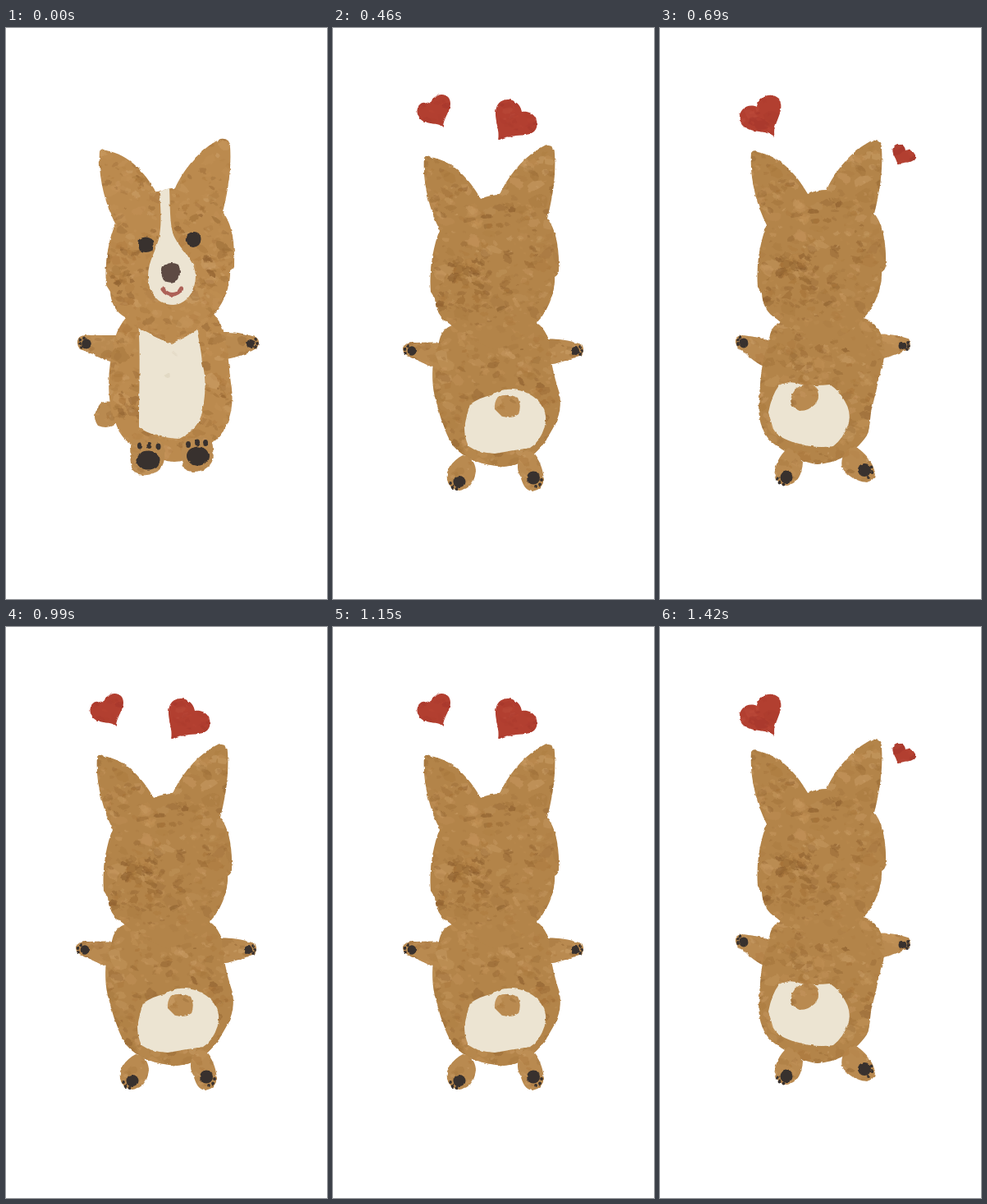
An HTML page that plays this animation: 391x695 px, repeating every 1530 ms.

```html
<!DOCTYPE html>
<html lang="en">
<head>
<meta charset="utf-8">
<title>Jumping corgi</title>
<style>
html, body { margin: 0; width: 100%; height: 100%; overflow: hidden; background: #fff; }
svg { display: block; width: 100vw; height: 100vh; }
</style>
</head>
<body>
<svg id="stage" viewBox="0 0 391 695" xmlns="http://www.w3.org/2000/svg"></svg>
<script>
const INK = '#38312e', CREAM = '#ece4d2', RED = '#b23f30';
const FRONT = '#bb8a4e', BACK = '#b38449', LIMB = '#b98a50';
const DARK = ['#8a5c2c', '#9c6c35', '#a87439'], LIGHT = ['#cc9d66', '#c6955b', '#d2a873'];

let clips = 0;

function random(seed) {
  let s = seed * 7919 + 17;
  return () => {
    s = (s * 1664525 + 1013904223) % 4294967296;
    return s / 4294967296;
  };
}

const shape = (d, fill) => `<path d="${d}" fill="${fill}"/>`;
const oval = (x, y, rx, ry = rx, fill = INK, turn = 0) =>
  `<ellipse cx="${x}" cy="${y}" rx="${rx}" ry="${ry}" fill="${fill}" transform="rotate(${turn} ${x} ${y})"/>`;
const group = (x, y, inner) => `<g transform="translate(${x} ${y})">${inner}</g>`;
const line = (d, color, width) =>
  `<path d="${d}" fill="none" stroke="${color}" stroke-width="${width}" stroke-linecap="round"/>`;

// An irregular, slightly slanted brush dab
function dab(rnd, x, y, size, fill, alpha) {
  const n = 8, tilt = -0.6 + rnd() * 1.5, flat = 0.4 + rnd() * 0.4;
  const pts = [];
  for (let i = 0; i < n; i++) {
    const a = i / n * Math.PI * 2, r = size * (0.6 + rnd() * 0.6);
    const u = Math.cos(a) * r, v = Math.sin(a) * r * flat;
    const px = x + u * Math.cos(tilt) - v * Math.sin(tilt);
    const py = y + u * Math.sin(tilt) + v * Math.cos(tilt);
    pts.push(px.toFixed(1) + ',' + py.toFixed(1));
  }
  return `<path d="M${pts.join('L')}Z" fill="${fill}" opacity="${alpha.toFixed(2)}"/>`;
}

// A shape painted with mottled watercolour; spots are [x, y, radius, count]
function painted(d, base, seed, spots = [], darks = DARK, lights = LIGHT) {
  const rnd = random(seed), id = 'clip' + clips++;
  const nums = d.match(/-?\d+(\.\d+)?/g).map(Number);
  const xs = nums.filter((_, i) => i % 2 === 0), ys = nums.filter((_, i) => i % 2);
  const x0 = Math.min(...xs), y0 = Math.min(...ys);
  const w = Math.max(...xs) - x0, h = Math.max(...ys) - y0;
  const pick = list => list[Math.floor(rnd() * list.length)];
  let out = '';
  for (let i = 0, n = w * h / 85; i < n; i++) {
    const tones = rnd() < 0.5 ? darks : lights;
    out += dab(rnd, x0 + rnd() * w, y0 + rnd() * h, 2 + rnd() * rnd() * 12, pick(tones), 0.12 + rnd() * 0.28);
  }
  for (const [x, y, r, n] of spots) {
    for (let i = 0; i < n; i++) {
      const a = rnd() * 6.283, q = Math.sqrt(rnd()) * r;
      out += dab(rnd, x + Math.cos(a) * q, y + Math.sin(a) * q, 2 + rnd() * 6, pick(darks), 0.25 + rnd() * 0.35);
    }
  }
  return `<clipPath id="${id}"><path d="${d}"/></clipPath>${shape(d, base)}<g clip-path="url(#${id})">${out}</g>`;
}

const heart = (d, seed) => painted(d, RED, seed, [], ['#9c3128', '#a5372b'], ['#c04a3a', '#bd5140']);
const limb = (d, seed) => painted(d, LIMB, seed);

// Pad with toes: [x, y, rx, ry], then toe centres
const paw = ([x, y, rx, ry], toes, tx = 1.9, ty = tx) =>
  oval(x, y, rx, ry) + toes.map(([a, b]) => oval(a, b, tx, ty)).join('');

const HEAD = 'M114,150 Q117,145 122,149 C150,154 169,176 183,200 Q194,195 206,195 ' +
  'C215,174 236,147 261,135 Q273,133 273,145 C275,174 269,205 264,224 ' +
  'C274,236 279,258 278,288 Q277,293 273,295 C274,315 264,337 252,350 ' +
  'C238,367 217,377 201,384 C182,377 160,366 145,352 C133,345 128,335 127,321 L122,313 ' +
  'C120,290 124,260 133,238 C120,212 112,180 114,150 Z';

const frontHead = painted(HEAD, FRONT, 5,
  [[143, 287, 23, 28], [158, 188, 10, 8], [140, 322, 14, 8], [225, 232, 22, 10], [256, 285, 18, 8]]) +
  shape('M187,199 Q193,196 199,195 C200,215 199,238 204,252 C211,269 229,280 231,300 ' +
    'C231,322 219,337 203,337 C185,337 173,322 173,302 C173,283 184,270 187,252 C190,236 188,216 187,199 Z', CREAM) +
  shape('M162,257 Q170,252 178,257 Q181,264 178,271 Q170,275 163,271 Q160,264 162,257 Z', INK) +
  shape('M220,252 Q228,245 235,250 Q240,257 235,264 Q228,270 221,264 Q217,258 220,252 Z', INK) +
  shape('M191,290 Q200,283 210,288 Q214,297 210,306 Q201,313 192,307 Q187,298 191,290 Z', '#5d4a43') +
  line('M191,318 Q195,324 202,324.5 Q210,324 213.500,317', '#ad6157', 5);

const backHead = painted(HEAD, BACK, 9,
  [[168, 288, 26, 28], [195, 315, 24, 18], [142, 318, 18, 14], [205, 220, 20, 9], [157, 192, 12, 7], [244, 268, 14, 6]]);

const frontBody = painted('M150,348 C138,362 134,370 131,386 C124,415 122,452 133,480 ' +
  'C138,497 150,506 160,512 C175,521 190,527 205,528 C220,528 238,516 250,506 ' +
  'C268,494 278,468 275,440 C272,418 271,402 269,388 C266,366 260,356 252,347 Z', FRONT, 14,
  [[144, 460, 16, 10], [258, 440, 14, 8], [185, 508, 22, 6]]) +
  shape('M161,355 C164,395 162,440 162,486 C172,494 192,499 211,500 C226,493 238,480 240,462 ' +
    'C243,445 244,425 239,408 C238,390 233,375 231,355 Z', CREAM) +
  dab(random(3), 197, 423, 4, '#ded4bd', 0.7) + dab(random(8), 207, 397, 5, '#e2d9c4', 0.7);

const standing =
  limb('M133,456 Q113,451 112,464 Q104,472 112,484 Q125,489 134,481 L145,470 Z', 21) +
  limb('M146,374 L104,374 Q91,373 88,378 Q85,385 90,391 C105,395 115,404 132,407 L146,400 Z', 22) +
  limb('M254,371 C275,368 290,372 304,376 Q311,381 306,389 C295,397 280,401 264,404 Z', 23) +
  paw([98, 384.5, 5.8, 6], [[90.5, 379], [90, 384], [92, 388.5], [95, 377.5]]) +
  paw([298, 384.5, 5, 5.5], [[304, 379], [306, 384], [304, 388]]) +
  frontBody +
  limb('M151,509 Q152,500 161,501 L183,499 Q194,502 193,514 C194,526 192,534 184,540 Q168,548 156,541 C150,531 152,520 151,509 Z', 24) +
  limb('M218,501 Q232,496 246,500 Q253,504 252,514 C255,525 249,534 240,538 Q226,543 217,536 C212,526 213,512 218,501 Z', 25) +
  paw([173, 526, 14.5, 11.5], [[163, 508.5], [174.5, 508], [185.5, 509.5]], 3, 4) +
  paw([233.5, 521, 13.5, 11.5], [[222, 507], [233, 504.5], [243, 505]], 3, 4) +
  frontHead;

const jumping =
  limb('M152,410 Q138,403 128,409 Q121,424 127,435 Q138,442 150,435 Z', 31) +
  limb('M152,312 L121,300 Q114,296 109,302 Q107,310 113,316 C118,329 127,340 140,346 Z', 32) +
  limb('M268,299 C288,301 296,317 303,333 Q305,340 300,346 Q293,349 287,344 L270,337 Z', 33) +
  paw([119.5, 309.5, 6], [[112, 306], [112.5, 302], [117, 301]]) +
  paw([293.5, 338, 5], [[299, 344], [302, 338], [295.5, 345.5]]) +
  limb('M174,440 C171,470 172,480 173,490 Q184,499 193,492 C196,480 194,465 195,440 Z', 34) +
  limb('M226,440 C225,470 225,480 228,490 Q236,496 243,489 C248,478 246,465 245,440 Z', 35) +
  paw([178.5, 490.5, 2.5, 4.5], [[183.5, 491.5], [188, 490]], 2.2, 4.3) +
  paw([231, 488.5, 2.3, 4], [[236, 488], [240, 486.5]], 2.2, 4) +
  group(10.5, -69, frontBody + frontHead) +
  ['M144,492 Q145,505 151,514', 'M151,486 Q151,492 153,496',
   'M272,482 Q272,492 268,500', 'M278,495 Q277,504 272,510'].map(d => line(d, INK, 1.5)).join('');

const wagRight =
  limb('M140,382 L100,383 Q88,382 85,389 Q85,398 92,400 C104,404 115,412 132,416 Z', 41) +
  limb('M254,379 C275,377 290,381 303,385 Q307,391 303,398 C290,403 275,408 258,411 Z', 42) +
  paw([96, 393, 5.3, 5.8], [[87.5, 391], [88, 396], [91, 387]]) +
  paw([295, 393, 5], [[301, 388], [303, 393], [301, 397]]) +
  painted('M145,362 C132,367 130,376 128,388 C119,405 120,435 125,452 C132,480 139,498 146,508 ' +
    'C160,525 182,532 208,534 C235,533 255,512 264,494 C274,478 279,465 276,445 ' +
    'C268,420 265,405 263,380 C259,368 252,361 247,358 Z', BACK, 43, [[195, 410, 40, 12], [260, 445, 15, 6]]) +
  shape('M160,486 Q163,470 167,458 Q180,449 193,447 Q205,438 220,440 Q240,442 253,457 Q262,469 258,485 ' +
    'Q252,504 240,511 Q220,514 197,518 Q176,517 165,509 Q160,498 160,486 Z', CREAM) +
  limb('M201,449 Q213,444 225,450 Q230,460 226,470 Q216,477 205,472 L197,464 Q196,456 201,449 Z', 44) +
  limb('M158,520 C145,527 137,538 139,550 Q142,562 154,563 C168,561 173,550 174,538 Q172,522 158,520 Z', 45) +
  limb('M237,513 C225,520 222,535 228,545 C231,555 234,563 243,564 Q255,562 257,550 C256,535 249,518 237,513 Z', 46) +
  paw([154, 552.5, 7.5], [[143, 554], [145.5, 559], [150.5, 561]]) +
  paw([244, 547.5, 8], [[254, 550], [252, 555.5], [247, 558]]) +
  group(-3, 8, backHead) +
  heart('M134,121 C128,113 107,120 103,105 C100,94 110,87 119,92 C121,82 134,77 141,85 C148,97 134,108 134,121 Z', 47) +
  heart('M201,137 C204,125 195,108 199,97 C203,83 226,83 230,102 C242,100 251,110 248,121 C243,136 220,126 201,137 Z', 48);

const wagLeft =
  limb('M140,383 C118,375 108,375 100,374 Q90,375 92,383 Q94,391 101,393 C110,402 118,409 132,414 Z', 51) +
  limb('M256,374 C275,371 290,374 302,378 Q307,384 303,391 C290,397 280,400 262,405 Z', 52) +
  paw([102, 383.5, 5.5, 6], [[95, 380], [95, 385], [97.5, 377]]) +
  paw([295.5, 387, 5], [[302, 383], [303, 387], [301, 391]]) +
  painted('M148,357 C134,363 134,374 132,386 C124,400 122,432 121,450 C118,475 124,492 136,504 ' +
    'C150,515 175,530 192,531 C220,529 240,514 252,496 C257,484 255,475 258,463 ' +
    'C264,440 266,428 269,416 C275,402 275,385 268,370 C260,357 252,354 247,353 Z', BACK, 53, [[195, 400, 40, 12], [245, 440, 16, 6]]) +
  shape('M132,468 Q136,447 145,435 Q158,428 172,434 Q190,436 207,434 Q219,442 225,454 Q233,467 230,481 ' +
    'Q223,500 211,509 Q187,512 166,505 Q145,500 138,488 Z', CREAM) +
  limb('M165,440 Q176,430 189,436 Q196,446 191,456 Q182,466 170,466 Q160,462 159,453 Q160,446 165,440 Z', 54) +
  limb('M156,511 C145,520 138,535 140,547 Q146,557 155,557 C167,554 173,545 174,528 Q168,516 156,511 Z', 55) +
  limb('M237,509 C225,512 219,525 222,535 C227,545 240,552 252,553 Q262,550 262,542 C260,530 250,516 237,509 Z', 56) +
  paw([154, 547, 7.5], [[143, 548.5], [145.5, 553.5], [150.5, 555.5]]) +
  paw([249, 538, 8], [[257.5, 534.5], [258.5, 541], [254, 547]]) +
  group(-3, 2, backHead) +
  heart('M140,133 C132,122 102,131 97,112 C95,99 107,91 118,96 C119,83 136,77 145,86 C154,102 135,117 140,133 Z', 57) +
  heart('M289,168 C290,160 281,153 284,146 C287,138 298,140 299,149 C305,147 312,152 311,158 C307,166 296,161 289,168 Z', 58);

const stage = document.getElementById('stage');
stage.innerHTML =
  `<filter id="rough" filterUnits="userSpaceOnUse" x="0" y="0" width="391" height="695" color-interpolation-filters="sRGB">
    <feTurbulence type="fractalNoise" baseFrequency="0.16" numOctaves="2" seed="4" result="noise"/>
    <feDisplacementMap in="SourceGraphic" in2="noise" scale="3" xChannelSelector="R" yChannelSelector="G"/>
  </filter>` +
  [standing, jumping, wagRight, wagLeft].map(p => `<g class="pose" filter="url(#rough)">${p}</g>`).join('');

const poses = stage.querySelectorAll('.pose');
const LOOP = 1530;
// [end time, pose]
const steps = [[230, 0], [460, 1], [690, 2], [990, 3], [1260, 2], [LOOP, 3]];

function draw(ms) {
  const t = ms % LOOP;
  const current = steps.find(([end]) => t < end)[1];
  poses.forEach((p, i) => { p.style.display = i === current ? '' : 'none'; });
}

const start = performance.now();
function tick() {
  draw(performance.now() - start);
  requestAnimationFrame(tick);
}
tick();
</script>
</body>
</html>
```
